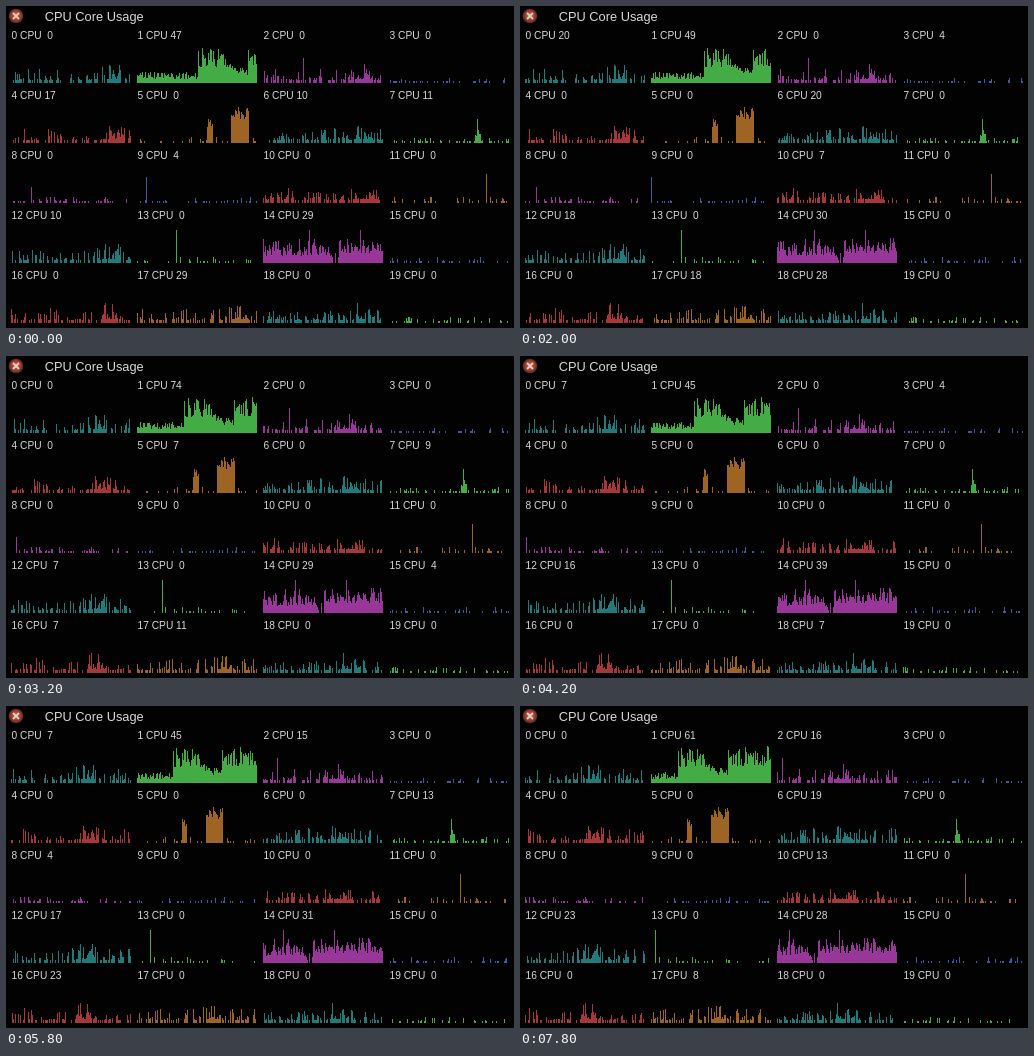
These frames come from a looping animation (508x322 px, 8 s). An HTML page with a canvas:

```html
<!DOCTYPE html>
<html lang="en">
<head>
<meta charset="utf-8">
<title>CPU Core Usage</title>
<style>
  html, body { margin: 0; width: 100%; height: 100%; overflow: hidden; background: #020203; }
  canvas { display: block; }
</style>
</head>
<body>
<canvas id="stage" width="508" height="322"></canvas>
<script>
const ctx = document.getElementById('stage').getContext('2d');
const LOOP = 8000, STEP = 200;
const CORES = 20, COLUMNS = 4;
const SPACING = 0.89;      // pixels between neighbouring samples
const SAMPLES = 135;       // samples visible in one graph
const PX_PER_PERCENT = 0.4;
const FONT = '"Liberation Sans", Arial, sans-serif';
const COLORS = ['#217b7b', '#43ac45', '#99369a', '#4357a2', '#a7383a', '#9e6423'];

// Odd cores are mostly idle siblings of the even ones.
const isQuiet = core => core === 8 || (core % 2 === 1 && core !== 17);

// Single peaks; x is the place in the graph when the loop starts.
const SPIKES = [
  { core: 2, x: 40, load: 62 }, { core: 4, x: 113, load: 37 },
  { core: 7, x: 88, load: 60 }, { core: 8, x: 20, load: 40 },
  { core: 9, x: 9, load: 66 }, { core: 11, x: 97, load: 72 },
  { core: 13, x: 39, load: 83 }, { core: 14, x: 46, load: 82 },
  { core: 14, x: 97, load: 82 }
];

// Longer stretches of work, with the range of their load.
const BURSTS = [
  { core: 1, x: 0, width: 61, low: 10, high: 28 },
  { core: 1, x: 61, width: 32, low: 38, high: 88 },
  { core: 1, x: 93, width: 18, low: 20, high: 46 },
  { core: 1, x: 111, width: 50, low: 42, high: 92 },
  { core: 5, x: 70, width: 5, low: 35, high: 62 },
  { core: 5, x: 94, width: 18, low: 60, high: 92 },
  { core: 7, x: 86, width: 5, low: 18, high: 42 },
  { core: 14, x: 0, width: 68, low: 18, high: 60 },
  { core: 14, x: 75, width: 85, low: 24, high: 64 }
];

// Seeded random number from 0 to 1.
function random(core, sample, salt) {
  let h = Math.imul(core + 1, 374761393) ^ Math.imul(sample + 7, 668265263) ^ Math.imul(salt, 982451653);
  h = Math.imul(h ^ (h >>> 15), 2246822519);
  h = Math.imul(h ^ (h >>> 13), 3266489917);
  return ((h ^ (h >>> 16)) >>> 0) / 2 ** 32;
}

function backgroundLoad(core, x, chance, amount) {
  if (isQuiet(core)) return chance < 0.22 ? 4 + 12 * amount ** 3 : 0;
  // All busy cores share one wave of extra work.
  const wave = Math.exp(-(((x - 100) / 10) ** 4));
  return chance < 0.5 + 0.45 * wave ? (7 + 30 * amount ** 3) * (1 + 0.4 * wave) : 0;
}

function usage(core, sample) {
  const x = sample * SPACING;
  const amount = random(core, sample, 1);
  const spike = SPIKES.find(s => s.core === core && Math.round(s.x / SPACING) === sample);
  if (spike) return spike.load;
  const burst = BURSTS.find(b => b.core === core && x >= b.x && x < b.x + b.width);
  const load = burst
    ? burst.low + (burst.high - burst.low) * amount ** 1.4
    : backgroundLoad(core, x, random(core, sample, 2), amount);
  return Math.round(load);
}

function drawText(text, x, y, size) {
  ctx.font = `${size}px ${FONT}`;
  ctx.fillStyle = '#d8d8d8';
  ctx.fillText(text, x, y);
}

function drawCore(core, step) {
  const left = 5 + core % COLUMNS * 126;
  const bottom = 77 + Math.floor(core / COLUMNS) * 60;
  const load = usage(core, step + SAMPLES - 1);
  drawText(`${core} CPU ${String(load).padStart(2)}`, left + 0.6, bottom - 44, 10.2);
  ctx.fillStyle = COLORS[core % COLORS.length];
  for (let i = 0; i < SAMPLES; i++) {
    const height = Math.round(usage(core, step + i) * PX_PER_PERCENT);
    ctx.fillRect(left + Math.round(i * SPACING), bottom - height, 1, height);
  }
}

function drawCloseButton() {
  const shade = ctx.createRadialGradient(10, 9, 1, 10, 10, 7.5);
  shade.addColorStop(0, '#d0573f');
  shade.addColorStop(0.6, '#a03a28');
  shade.addColorStop(1, '#3c2c2a');
  ctx.fillStyle = shade;
  ctx.beginPath();
  ctx.arc(10, 10, 7.3, 0, Math.PI * 2);
  ctx.fill();
  ctx.strokeStyle = '#ddd3cd';
  ctx.lineWidth = 1.8;
  ctx.beginPath();
  ctx.moveTo(7, 7);
  ctx.lineTo(13, 13);
  ctx.moveTo(13, 7);
  ctx.lineTo(7, 13);
  ctx.stroke();
}

function draw() {
  const step = Math.floor(performance.now() % LOOP / STEP);
  ctx.fillStyle = '#020203';
  ctx.fillRect(0, 0, 508, 322);
  drawCloseButton();
  drawText('CPU Core Usage', 38.8, 15, 12.8);
  for (let core = 0; core < CORES; core++) drawCore(core, step);
  requestAnimationFrame(draw);
}
draw();
</script>
</body>
</html>
```
